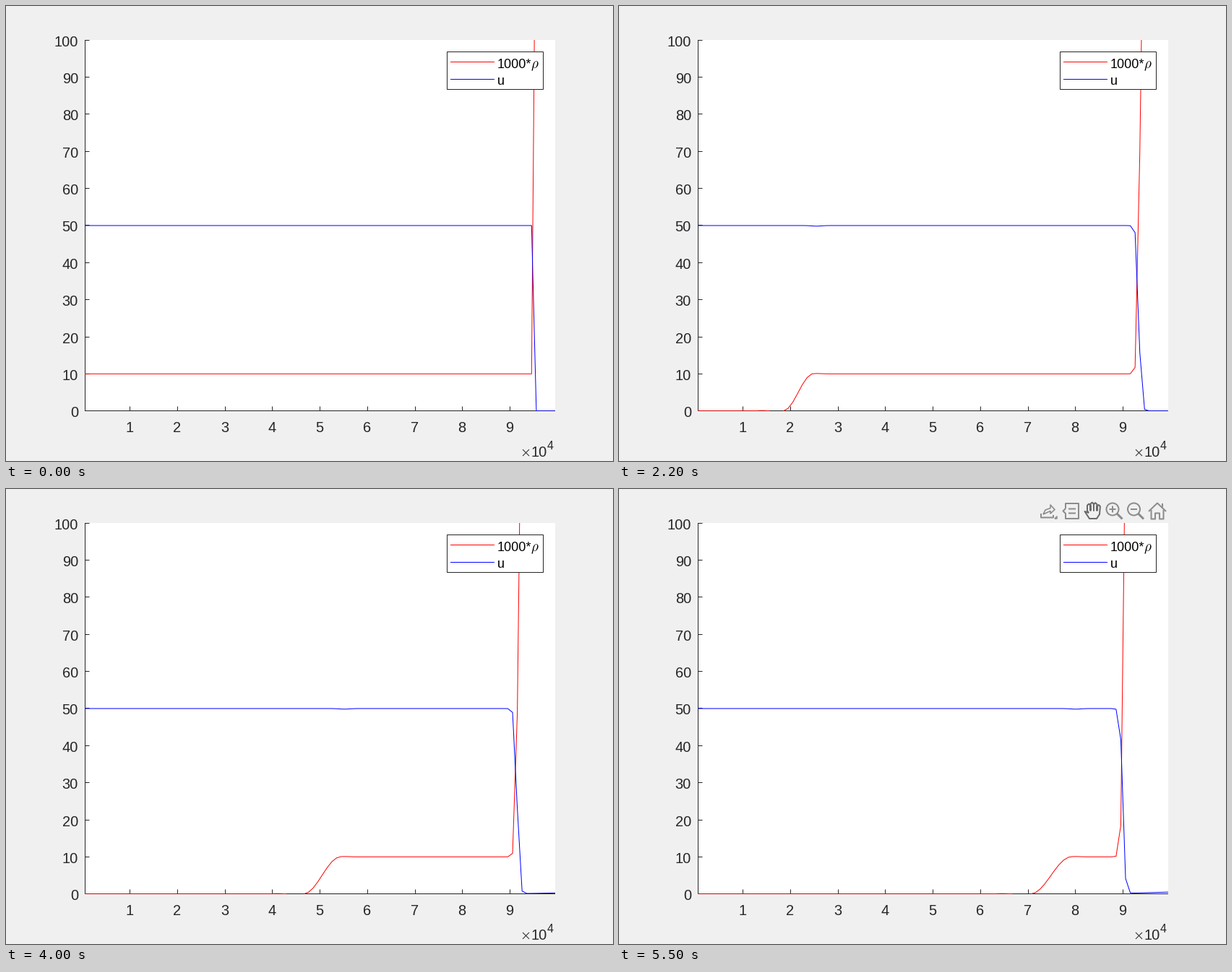
A matplotlib script that plays this animation: 840 by 630 pixels, repeating every 5.6 s.

```python
import numpy as np
import matplotlib.pyplot as plt
from matplotlib.animation import FuncAnimation
from matplotlib.patches import Circle, Rectangle

plt.rcParams["path.simplify"] = False
plt.rcParams["path.snap"] = False
plt.rcParams["font.family"] = "Liberation Sans"

W, H, DPI = 840, 630, 100
PT = 72 / DPI
FRAMES, INTERVAL = 56, 100
LEFT, RIGHT, TOP, BOTTOM = 109.2, 760.2, 47.25, 560.7
INK, RED, BLUE = "#262626", "#ff0000", "#0000ff"
ICON, HAND = "#8c8c8c", "#6a6a6a"

fig = plt.figure(figsize=(W / DPI, H / DPI), dpi=DPI, facecolor="#f0f0f0")
ax = fig.add_axes([0, 0, 1, 1])
ax.set_xlim(0, W)
ax.set_ylim(H, 0)
ax.axis("off")


def px(x):
    """Road position in km to pixels."""
    return LEFT + (x - 0.5) * (RIGHT - LEFT) / 99


def py(v):
    return BOTTOM - v * (BOTTOM - TOP) / 100


def crisp(p):
    return np.floor(p) + 0.5


def stroke(points, color=INK, width=1, z=2):
    xs, ys = zip(*points)
    return ax.plot(xs, ys, color=color, lw=width * PT, zorder=z,
                   solid_capstyle="butt")[0]


def label(x, y, text, size=20, color=INK, ha="left", **kw):
    ax.text(x, y, text, fontsize=size * PT, color=color, ha=ha,
            va="baseline", zorder=7, **kw)


# Axes
ax.add_patch(Rectangle((109, 47), 651, 514, fc="white", ec="none", zorder=1))
stroke([(109.5, 47), (109.5, 561)])
stroke([(109, 560.5), (760, 560.5)])
for v in range(0, 101, 10):
    y = crisp(py(v))
    stroke([(109, y), (115.5, y)])
    label(100, y + 8.5, str(v), ha="right")
for n in range(1, 10):
    x = crisp(px(10 * n))
    stroke([(x, 554.5), (x, 561)])
    label(x - 0.5, 590, str(n), ha="center")
stroke([(715, 614), (724, 623)])
stroke([(715, 623), (724, 614)])
label(727, 624.5, "10")
label(749, 614.5, "4", 16)

# Legend
ax.add_patch(Rectangle((610.5, 63.5), 133, 52, fc="white", ec=INK,
                       lw=PT, zorder=6))
stroke([(615, 77.5), (676, 77.5)], RED, z=7)
stroke([(615, 101.5), (676, 101.5)], BLUE, z=7)
label(680, 86, "1000*", 18, "black")
label(726.5, 86, r"$\rho$", 19, "black", math_fontfamily="cm")
label(680, 109, "u", 18, "black")

# Toolbar
icons = []


def icon(points, color=ICON, width=2):
    icons.append(stroke(points, color, width, z=8))


def lens(cx, cy):
    ring = Circle((cx, cy), 8.5, fc="none", ec=ICON, lw=2 * PT, zorder=8)
    icons.append(ax.add_patch(ring))
    icon([(cx + 6, cy + 6), (cx + 13.5, cy + 13.5)], width=3)
    icon([(cx - 4.5, cy), (cx + 4.5, cy)])


def hand():
    outline = [(650, 33)]
    for i in range(4):
        x, tip = 648 + 4.5 * i, 23 - 4.5 * np.sin(np.pi * (i + 0.7) / 4)
        outline += [(x, 30), (x, tip + 2), (x + 2.2, tip), (x + 4.4, tip + 2)]
    outline += [(665, 35), (661, 41), (651, 41), (644.5, 31), (650, 33)]
    icon(outline, HAND)


# Export: tray, arrow, corner mark
icon([(584, 34), (584, 39.5), (601, 39.5), (601, 36)])
icon([(587, 35), (590, 29), (597, 26.5), (597, 22), (603, 28.5),
      (597, 34), (597, 30.5), (587, 35)], width=1.6)
icon([(603, 41), (606, 41), (606, 38), (603, 41)], width=1.5)
# Data tip
icon([(618, 27), (618, 20), (636, 20), (636, 41), (618, 41), (618, 34),
      (614.5, 30.5), (618, 27)])
for y in (27.5, 33.5):
    icon([(622, y), (632, y)])
hand()
lens(683, 28)
icon([(683, 23.5), (683, 32.5)])
lens(712.5, 28)
# Home
icon([(733, 31), (745, 19.5), (757, 31)])
icon([(736.5, 29), (736.5, 41.5), (742, 41.5), (742, 33.5), (748, 33.5),
      (748, 41.5), (753.5, 41.5), (753.5, 29)])
icon([(752, 25), (752, 20)])

# Traffic: a smooth front moves right while a jam shock creeps left
cells = np.arange(100) + 0.5
fine = np.linspace(0.5, 99.5, 99 * 8 + 1)


def logistic(s):
    return 1 / (1 + np.exp(-np.clip(s, -60, 60)))


def shock(front):
    """Density and speed around the jam; sharp at first, then smeared."""
    d = cells - (95 - 0.064 * front)
    steep = 4 + 40 * np.exp(-front)
    rho = 10 + 155 * logistic(steep * d)
    u = 50 * logistic(-steep * d - 1.25)
    drift = max(0, (front - 22) / 106)
    tail = 0.4 + 0.6 * (d - 1.2) / (d[-1] - 1.2)
    return rho, u + np.where(d > 1.2, drift * tail, 0)


def state(front):
    rho, u = shock(front)
    width = 2.1 * ((front + 0.01) / 3.7) ** 0.24
    z = (cells - front) / width
    rho += 5 * (np.sin(np.pi / 2 * np.clip(z, -1, 1)) - 1)
    # Numerical ripple: one wave behind the front, a bump ahead of it
    ripple = 0.1 * np.sin(np.pi * (z + 0.95) / 0.95)
    rho += np.where((z < -0.95) & (z > -2.85), ripple, 0)
    bump = min(1, front) * np.exp(-0.5 * (cells - front - 1.2 * width) ** 2)
    return rho + 0.1 * bump, u - 0.17 * bump


def curve(color, z):
    line = ax.plot([], [], color=color, lw=PT, zorder=z)[0]
    line.set_clip_path(Rectangle((108.7, 46.7), 651.5, 514.6,
                                 transform=ax.transData))
    return line


red, blue = curve(RED, 4), curve(BLUE, 5)


def show(line, values):
    v = np.interp(fine, cells, values)
    line.set_data(px(fine), py(np.where(v < -0.005, np.nan, v)))


def update(i):
    front = np.interp(i, [4, 9, 17, 40, 45, 55],
                      [0, 3.7, 13.6, 50.4, 59.8, 74.8])
    rho, u = state(front)
    show(red, rho)
    show(blue, u)
    for part in icons:
        part.set_alpha(np.clip((i - 42) / 7, 0, 1))
    return [red, blue, *icons]


anim = FuncAnimation(fig, update, frames=FRAMES, interval=INTERVAL,
                     repeat=True, repeat_delay=0, blit=False)
plt.show()
```
